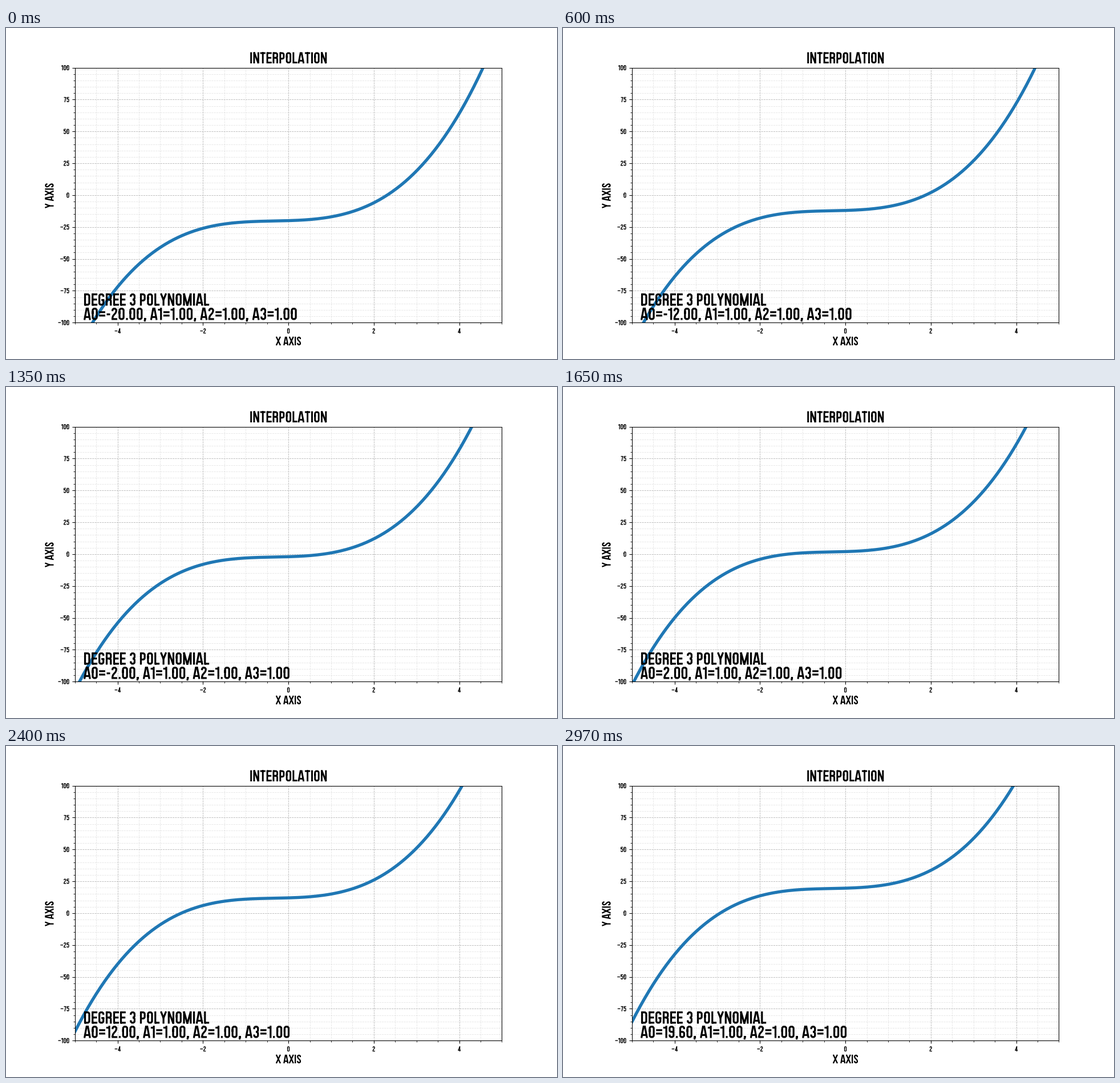
Write a matplotlib script that moves like this. It is 966x580 px and loops after 3 s.

```python
import numpy as np
import matplotlib.pyplot as plt
from matplotlib.animation import FuncAnimation
from matplotlib.patches import PathPatch
from matplotlib.path import Path
from matplotlib.transforms import Affine2D

W, H, DPI = 966, 580, 100
FRAMES, INTERVAL = 100, 30
PT = 72 / DPI          # points per pixel
K = 96.6 / DPI         # scale for default point sizes

# Condensed capitals drawn with strokes; the cap height is 100 units.
STROKE, RADIUS = 15, 14
ROWS = dict(z=-13, B=0, b=7.5, h=16, k=24, d=28, i=36, v=42, n=46, m=50,
            o=64, u=72, y=84, t=92.5, T=100)

# Advance width and strokes. A point is a column and a row; "~" rounds corners.
GLYPHS = {
    " ": (25, ""),
    "A": (62.7, "fB pT/gB qT/lk rk"),
    "D": (61.5, "lB lT/~lb rb rt lt"),
    "E": (55.7, "lB lT/lb eb/lm Rm/lt et"),
    "G": (60, "~ru rt lt lb rb rn/cn Rn"),
    "I": (27, "cB cT"),
    "L": (51, "lB lT/lb eb"),
    "M": (82, "lB lT/rB rT/lT cB/rT cB"),
    "N": (65, "lB lT/rB rT/lT rB"),
    "O": (60, "~lm lt rt rb lb lu"),
    "P": (58, "lB lT/~lt rt rv lv"),
    "R": (61, "lB lT/~lt rt rm lm/~cm rm rB"),
    "S": (58, "~ru rt lt lo ri rb lb ld"),
    "T": (53.6, "cB cT/st et"),
    "X": (64, "fB gT/gB fT"),
    "Y": (59, "cB cm/cn fT/cn gT"),
    "0": (60, "~lm lt rt rb lb lu"),
    "1": (41, "rB rT/sy ry"),
    "2": (58, "~lu lt rt ro ld lb/Lb Rb"),
    "3": (58, "~lu lt rt rm cm/~cm rm rb lb ld"),
    "4": (59, "jB jT/jT lk/Lk ek"),
    "5": (59, "Rt lt lm/~lo ro rb lb ld"),
    "6": (59, "~ru rt lt lb rb rm lm"),
    "7": (54, "Lt Rt/rt pB"),
    "8": (60, "~cm lm lt rt rm cm/~cm lm lb rb rm cm"),
    "9": (59, "~ld lb rb rt lt lm rm"),
    "=": (62, "Li Ri/Lo Ro"),
    "-": (40, "Ln Rn"),
    "\u2212": (64, "Lm Rm"),
    ".": (28, "cB ch"),
    ",": (30, "cB ch/ch pz"),
}


def columns(w):
    c = w / 2
    return dict(s=3, L=6, f=8.5, l=13.5, p=c - 4, c=c, q=c + 4, j=w - 18,
                r=w - 13.5, g=w - 8.5, R=w - 6, e=w - 3)


def stroke(points, rounded):
    """Polyline, with its inner corners turned into curves if rounded."""
    verts, codes = [points[0]], [Path.MOVETO]
    for a, p, b in zip(points, points[1:], points[2:]):
        if rounded:
            start, end = (p + (v - p) * RADIUS / np.hypot(*(v - p))
                          for v in (a, b))
            verts += [start, p, end]
            codes += [Path.LINETO, Path.CURVE3, Path.CURVE3]
        else:
            verts.append(p)
            codes.append(Path.LINETO)
    return verts + [points[-1]], codes + [Path.LINETO]


def layout(lines, cap, x, y, align=0.0, turn=0, pitch=0):
    """Path of text lines in stage pixels, y downwards, (x, y) on the baseline."""
    verts, codes = [], []
    for row, line in enumerate(lines):
        pen = -align * sum(GLYPHS[ch][0] for ch in line)
        drop = row * pitch * 100 / cap
        for ch in line:
            width, shape = GLYPHS[ch]
            cols = columns(width)
            for part in filter(None, shape.split("/")):
                pts = [np.array([pen + cols[p[0]], drop - ROWS[p[1]]])
                       for p in part.lstrip("~").split()]
                v, c = stroke(pts, part[0] == "~")
                verts += v
                codes += c
            pen += width
    place = Affine2D().scale(cap / 100).rotate_deg(turn).translate(x, y)
    return place.transform_path(Path(verts, codes))


fig = plt.figure(figsize=(W / DPI, H / DPI), dpi=DPI, facecolor="white")
stage = (Affine2D().scale(1, -1).translate(0, H).scale(1 / DPI)
         + fig.dpi_scale_trans)


def write(lines, cap, *args, **kw):
    patch = PathPatch(layout(lines, cap, *args, **kw), fill=False,
                      edgecolor="black", lw=cap * STROKE / 100 * PT,
                      capstyle="butt", joinstyle="miter", snap=False,
                      transform=stage, zorder=5)
    fig.add_artist(patch)
    return patch


ax = fig.add_axes([0.125, 0.11, 0.775, 0.77])
ax.set(xlim=(-5, 5), ylim=(-100, 100),
       xticks=range(-4, 5, 2), yticks=range(-100, 101, 25))
ax.set_xticks(np.arange(-5, 5.1, 0.5), minor=True)
ax.set_yticks(np.arange(-100, 101, 5), minor=True)
ax.tick_params(which="major", length=3.5 * K, width=0.8 * K)
ax.tick_params(which="minor", length=2 * K, width=0.6 * K)
ax.tick_params(labelleft=False, labelbottom=False)
ax.grid(which="major", color="#b0b0b0", ls="--", lw=0.6 * K)
ax.grid(which="minor", color="#b0b0b0", ls="--", lw=0.6 * K, alpha=0.35)
for spine in ax.spines.values():
    spine.set_linewidth(0.8 * K)


def number(v):
    return str(v).replace("-", "\u2212")


TICK = 9
for v in range(-100, 101, 25):
    write([number(v)], TICK, 111.2, 292.9 - v * 2.233 + TICK / 2, align=1)
for v in range(-4, 5, 2):
    write([number(v)], TICK, 495.1 + v * 74.865, 535.3, align=0.5)
write(["INTERPOLATION"], 19.5, 495.3, 62, align=0.5)
write(["X AXIS"], 15.1, 495.3, 556, align=0.5)
write(["Y AXIS"], 15.1, 83.5, 293.8, align=0.5, turn=-90)

INFO = dict(cap=21.4, x=135.7, y=486.5, pitch=25.1)


def info_lines(a0):
    return ["DEGREE 3 POLYNOMIAL",
            f"A0={a0:.2f}, A1=1.00, A2=1.00, A3=1.00"]


xs = np.linspace(-5, 5, 200)
curve, = ax.plot(xs, xs, color="#1f77b4", lw=4 * K)
info = write(info_lines(-20), **INFO)


def update(i):
    a0 = -20 + 0.4 * i
    curve.set_ydata(a0 + xs + xs**2 + xs**3)
    info.set_path(layout(info_lines(a0), **INFO))
    return curve, info


anim = FuncAnimation(fig, update, frames=FRAMES, interval=INTERVAL,
                     repeat=True, repeat_delay=0, blit=False)
plt.show()
```
